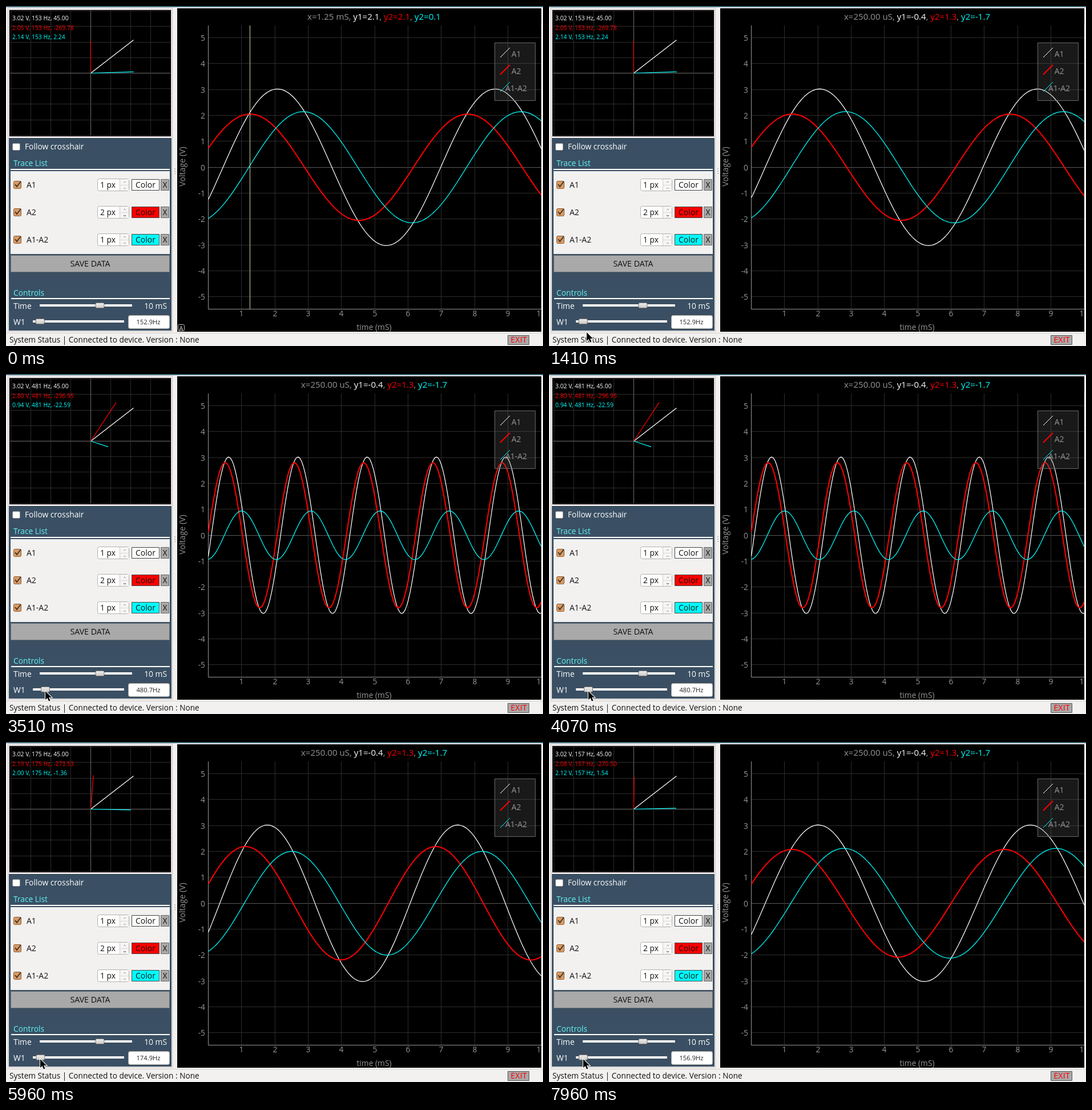
Animation, 941 px wide and 595 px high, one loop 8 s. Source, as an HTML page with a canvas:

```html
<!DOCTYPE html>
<html lang="en">
<head>
<meta charset="utf-8">
<title>Oscilloscope</title>
<style>
  html, body { margin: 0; width: 100%; height: 100%; overflow: hidden; background: #f2f1f0; }
  canvas { display: block; }
</style>
</head>
<body>
<canvas id="stage" width="941" height="595"></canvas>
<script>
const ctx = document.getElementById('stage').getContext('2d');
const LOOP = 8000, TAU = 2 * Math.PI, DEG = Math.PI / 180;
const GREY = '#969696', WINDOW = '#f2f1f0', CYAN = '#00ffff', RED = '#ff0000', WHITE = '#ffffff';
const TRACES = [
  { name: 'A1', color: WHITE, width: 1 },
  { name: 'A2', color: RED, width: 2 },
  { name: 'A1-A2', color: CYAN, width: 1 }
];

// Sweeps arrive at a steady rate and show the frequency set a moment earlier.
const SWEEP_START = 90, SWEEP_PERIOD = 171, SWEEP_LAG = 165;
const IDLE_HZ = 152.9, FIRST_RETUNE = 3300;
const HZ_MOVES = [
  { from: 2400, to: 2620, hz: 176.9 },
  { from: 2960, to: 3340, hz: 480.7 },
  { from: 4200, to: 4540, hz: 344.8 },
  { from: 4860, to: 5270, hz: 174.9 },
  { from: 5970, to: 7740, hz: 156.9 }
];

// The pointer leaves the plot, wanders below the slider and then holds its handle.
const PLOT_EXIT = 660, GRAB = 2180;
const WANDER = [
  { time: PLOT_EXIT, x: 298, y: 500 },
  { time: 860, x: 2, y: 573 },
  { time: 1050, x: 58, y: 574 },
  { time: 1410, x: 66, y: 571 },
  { time: 1700, x: 54, y: 578 },
  { time: GRAB, x: 60, y: 555 }
];

const mix = (a, b, k) => a + (b - a) * k;
const progress = (t, from, to) => Math.min(1, Math.max(0, (t - from) / (to - from)));
const handleX = hz => 55.5 + hz * .028;
const crosshairMs = t => mix(1.25, .25, progress(t, 300, PLOT_EXIT));

function controlHz(t) {
  const hz = HZ_MOVES.reduce((value, move) => mix(value, move.hz, progress(t, move.from, move.to)), IDLE_HZ);
  const wheeling = t > HZ_MOVES.at(-1).from;
  return wheeling ? Math.round(hz - .9) + .9 : hz;
}

// A1 drives a high-pass filter with output A2; the third trace is their difference.
function measure(t) {
  const sweep = Math.floor((t - SWEEP_START) / SWEEP_PERIOD);
  const time = SWEEP_START + sweep * SWEEP_PERIOD;
  const freq = time < FIRST_RETUNE ? IDLE_HZ : controlHz(time - SWEEP_LAG);
  const lead = Math.atan((157.9 - 584 / freq) / freq);
  const amp = (2.96 - 7.2 / freq) * Math.cos(lead);
  const dx = 3.02 - amp * Math.cos(lead), dy = -amp * Math.sin(lead);
  const jitter = .012 * Math.sin(2 * sweep);
  const phase = -.275 - .137 * (IDLE_HZ / freq) ** 3 + jitter;
  const vectors = [[3.02, 0], [amp, lead], [Math.hypot(dx, dy), Math.atan2(dy, dx)]].map(([size, shift]) => ({
    amp: size,
    angle: 45 + shift / DEG,
    volts: ms => size * Math.sin(TAU * freq * ms / 1000 + phase + shift)
  }));
  return { freq, vectors };
}

function text(str, x, y, color = '#111', size = 13.8, align = 'left') {
  ctx.font = `${size}px "Open Sans", "Noto Sans", sans-serif`;
  ctx.fillStyle = color;
  ctx.textAlign = align;
  ctx.fillText(str, x, y);
  return ctx.measureText(str).width;
}

function rect(x, y, w, h, fill, stroke, radius = 0) {
  ctx.beginPath();
  ctx.roundRect(x, y, w, h, radius);
  if (fill) { ctx.fillStyle = fill; ctx.fill(); }
  if (stroke) { ctx.strokeStyle = stroke; ctx.lineWidth = 1; ctx.stroke(); }
}

function line(points, color, width = 1) {
  ctx.beginPath();
  points.forEach(([x, y]) => ctx.lineTo(x, y));
  ctx.strokeStyle = color;
  ctx.lineWidth = width;
  ctx.stroke();
}

function clipped(x, y, w, h, draw) {
  ctx.save();
  ctx.beginPath();
  ctx.rect(x, y, w, h);
  ctx.clip();
  draw();
  ctx.restore();
}

function drawPhasors({ freq, vectors }) {
  const cx = 148.5, cy = 117.5, sx = 35.1, sy = 27.2;
  rect(5.5, 6.5, 284, 222, '#000', '#d8c8d0');
  clipped(7, 8, 281, 219, () => {
    for (let i = -4; i <= 4; i++) {
      const x = Math.floor(cx + i * sx) + .5, y = Math.floor(cy + i * sy) + .5;
      const color = i ? '#2b2b2b' : '#6e6e6e';
      line([[x, 8], [x, 228]], color);
      line([[7, y], [289, y]], color);
    }
    vectors.forEach((v, i) => {
      const { color } = TRACES[i], a = v.angle * DEG;
      line([[cx, cy], [cx + v.amp * Math.cos(a) * sx, cy - v.amp * Math.sin(a) * sy]], color, 1.2);
      const angle = (v.angle > 45 ? v.angle - 360 : v.angle).toFixed(2);
      text(`${v.amp.toFixed(2)} V, ${Math.round(freq)} Hz, ${angle}`, 11, 25 + i * 16.5, color, 10.35);
    });
  });
}

function drawTraceRow(trace, y) {
  rect(13.5, y - 6.5, 13, 13, '#dc9a5f', '#8a5a34', 2);
  line([[16, y - 1], [19, y + 3], [26, y - 6]], '#3c3c3c', 2);
  text(trace.name, 36, y + 5, '#111', 14);
  rect(160.5, y - 10.5, 55, 21, WHITE, '#b5b0aa', 3);
  rect(200, y - 10, 15, 20, '#f6f5f4');
  line([[199.5, y - 10], [199.5, y + 10]], '#d0ccc8');
  line([[200, y + .5], [215, y + .5]], '#dedbd8');
  text(`${trace.width} px`, 165, y + 5);
  line([[206, y - 4], [208, y - 6], [210, y - 4]], '#999');
  line([[206, y + 5], [208, y + 7], [210, y + 5]], trace.width > 1 ? '#333' : '#999');
  rect(220.5, y - 9.5, 48, 19, trace.color, '#444');
  text('Color', 244.5, y + 5, '#111', 14, 'center');
  rect(271.5, y - 9.5, 14, 19, '#a9a9a9', '#666');
  text('X', 278.5, y + 5, '#111', 13.8, 'center');
}

function drawSlider(x1, x2, y, handle) {
  rect(x1, y - 2, x2 - x1, 4, WHITE, null, 1);
  const shade = ctx.createLinearGradient(0, y - 5, 0, y + 5);
  shade.addColorStop(0, '#f2f0ee');
  shade.addColorStop(1, '#c9c5c1');
  rect(handle - 7.5, y - 4.5, 15, 9, shade, '#77736f', 2);
}

function drawSidebar(hz) {
  rect(5, 231, 285, 337, '#3a4f63');
  line([[5, 231.5], [290, 231.5]], '#2b3c4b');
  rect(11.5, 240.5, 13, 12, WHITE, '#8d8983', 2);
  text('Follow crosshair', 33, 251, WHITE);
  text('Trace List', 13, 280, '#5ff5f5');
  line([[8, 286], [287, 286]], WHITE, 2);
  rect(8, 289, 279, 145, WINDOW);
  TRACES.forEach((trace, i) => drawTraceRow(trace, 313 + i * 48));
  rect(8.5, 436.5, 278, 29, '#a9a9a9', '#6c7076');
  text('SAVE DATA', 147.5, 456, '#111', 14.2, 'center');
  text('Controls', 13, 507, '#5ff5f5');
  line([[9, 512], [287, 512]], WHITE, 2);
  text('Time', 13, 530, WHITE);
  drawSlider(59, 221, 524, 164.5);
  text('10 mS', 282, 530, WHITE, 13.8, 'right');
  text('W1', 13, 558, WHITE);
  drawSlider(47, 207, 552, handleX(hz));
  rect(214.5, 541.5, 72, 23, WHITE, '#aaa59f', 3);
  text(`${hz.toFixed(1)}Hz`, 249.5, 557, '#222', 11.2, 'center');
}

function drawTitle(t, vectors) {
  let parts = ['x=250.00 uS', 'y1=-0.4', 'y2=1.3', 'y2=-1.7'];
  if (t < PLOT_EXIT) {
    const ms = crosshairMs(t);
    const where = ms < 1 ? `${(ms * 1000).toFixed(2)} uS` : `${ms.toFixed(2)} mS`;
    parts = [`x=${where}`, ...vectors.map((v, i) => `${i ? 'y2' : 'y1'}=${v.volts(ms).toFixed(1)}`)];
  }
  const size = 15.1;
  ctx.font = `${size}px "Open Sans", "Noto Sans", sans-serif`;
  let x = 645 - ctx.measureText(parts.join(', ')).width / 2;
  parts.forEach((part, i) => {
    if (i) x += text(', ', x, 24, GREY, size);
    x += text(part, x, 24, i ? TRACES[i - 1].color : GREY, size);
  });
}

function drawLegend() {
  rect(856.5, 64.5, 71, 101, 'rgba(100,100,100,.25)', '#686868');
  TRACES.forEach(({ name, color, width }, i) => {
    const y = 90 + i * 30;
    line([[866, y], [883, y - 17]], color, width);
    text(name, 894, y - 1, GREY, 13.9, 'center');
  });
}

function drawPlot(t, { vectors }) {
  const X = ms => 354.6 + ms * 58.33, Y = volts => 282.2 - volts * 45.35;
  rect(300, 4, 638, 566, '#000');
  clipped(300, 4, 638, 566, () => {
    for (let i = -5; i <= 5; i++) {
      const y = Math.floor(Y(i)) + .5;
      line([[355, y], [938, y]], i ? '#2c2c2c' : '#5a5a5a');
      text(String(i), 349, y + 5, GREY, 13.8, 'right');
    }
    for (let i = 1; i <= 10; i++) {
      const x = Math.floor(X(i)) + .5;
      line([[x, 34], [x, 530]], '#2c2c2c');
      text(String(i), x, 543, GREY, 13.8, 'center');
    }
    line([[354.5, 34], [354.5, 530.5], [938, 530.5]], GREY);
    text('time (mS)', 645, 567, GREY, 13.8, 'center');
    ctx.save();
    ctx.translate(313.5, 281);
    ctx.rotate(-Math.PI / 2);
    text('Voltage (V)', 0, 0, GREY, 14.2, 'center');
    ctx.restore();
    vectors.forEach((v, i) => {
      const points = Array.from({ length: 201 }, (_, n) => [X(n / 20), Y(v.volts(n / 20))]);
      line(points, TRACES[i].color, Math.max(1.25, TRACES[i].width));
    });
    if (t < PLOT_EXIT) {
      const x = Math.floor(X(crosshairMs(t))) + .5;
      line([[x, 34], [x, 530]], '#d4d4a8');
      rect(301.5, 557.5, 11, 11, '#000', '#bbb', 2);
      text('A', 307, 567.5, '#ccc', 11.5, 'center');
    }
    drawLegend();
    drawTitle(t, vectors);
  });
}

function pointerAt(t, hz) {
  if (t >= GRAB) return { x: handleX(hz), y: 555 };
  const next = WANDER.findIndex(stop => stop.time > t);
  const a = WANDER[next - 1], b = WANDER[next];
  const k = progress(t, a.time, b.time);
  return { x: mix(a.x, b.x, k), y: mix(a.y, b.y, k) };
}

function drawPointer(t, hz) {
  if (t < PLOT_EXIT) return;
  const { x, y } = pointerAt(t, hz);
  ctx.save();
  ctx.translate(Math.round(x), Math.round(y));
  const arrow = new Path2D('M0 0V15L3.5 12L6 17.5L8.5 16.5L6 11H11Z');
  ctx.strokeStyle = WHITE;
  ctx.lineWidth = 2;
  ctx.stroke(arrow);
  ctx.fillStyle = '#000';
  ctx.fill(arrow);
  ctx.restore();
}

function draw(t) {
  const reading = measure(t), hz = controlHz(t);
  rect(0, 0, 941, 595, WINDOW);
  rect(0, 0, 941, 2, '#3d6577');
  rect(3.5, 3.5, 288, 566, null, '#c9c5c1');
  drawPhasors(reading);
  drawSidebar(hz);
  for (let y = 284; y <= 292; y += 4) rect(295, y, 2, 2, '#c4c0bc');
  drawPlot(t, reading);
  line([[0, 572.5], [941, 572.5]], '#d5d1cd');
  text('System Status | Connected to device. Version : None', 6, 589, '#111', 13.65);
  rect(879.5, 576.5, 37, 16, '#a9a9a9', '#555');
  text('EXIT', 898.5, 589, RED, 14.4, 'center');
  drawPointer(t, hz);
}

const start = performance.now();
function tick() {
  draw((performance.now() - start) % LOOP);
  requestAnimationFrame(tick);
}
tick();
</script>
</body>
</html>
```
